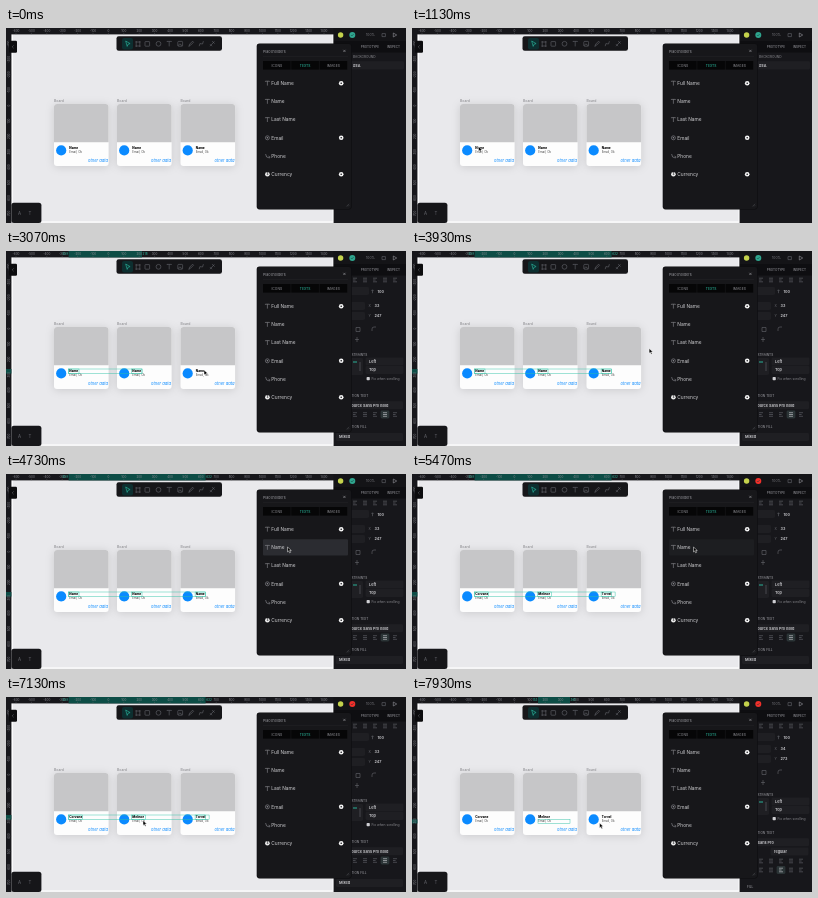
An HTML page for the animation above (8 s loop, 400 by 195 pixels).

```html
<!DOCTYPE html>
<html lang="en">
<head>
<meta charset="utf-8">
<title>Filling placeholders</title>
<style>
html, body { margin: 0; width: 100%; height: 100%; overflow: hidden; background: #e9e9ec; }
svg { display: block; width: 100%; height: 100%; }
text { font-family: Inter, "Open Sans", sans-serif; white-space: pre; }
.card { filter: drop-shadow(0 1px 4px rgba(0, 0, 0, .13)); }
</style>
</head>
<body>
<svg id="stage" viewBox="0 0 400 195" preserveAspectRatio="none"></svg>
<script>
const LOOP = 8000;
const NS = 'http://www.w3.org/2000/svg';
const stage = document.getElementById('stage');
const TEAL = '#2cc0a4', BLUE = '#0a8aff', DARK = '#17171b', FIELD = '#1f1f23';
const PALE = '#cfcfd3', DIM = '#66676d';

function add(parent, tag, attrs, content) {
  const el = document.createElementNS(NS, tag);
  for (const k in attrs) el.setAttribute(k, attrs[k]);
  if (content !== undefined) el.textContent = content;
  parent.appendChild(el);
  return el;
}
const group = (parent = stage, attrs = {}) => add(parent, 'g', attrs);
const rect = (p, x, y, width, height, fill, rx = 0, more = {}) =>
  add(p, 'rect', { x, y, width, height, fill, rx, ...more });
const text = (p, x, y, s, size, fill, more = {}) =>
  add(p, 'text', { x, y, 'font-size': size, fill, ...more }, s);
const circle = (p, cx, cy, r, fill, more = {}) => add(p, 'circle', { cx, cy, r, fill, ...more });
const line = (p, d, stroke = DIM, w = 0.6) =>
  add(p, 'path', { d, fill: 'none', stroke, 'stroke-width': w });
const outline = p => rect(p, 0, 0, 0, 0, 'none', 0, { stroke: TEAL, 'stroke-width': 0.45 });
const show = (el, on) => el.setAttribute('visibility', on ? 'visible' : 'hidden');
const lower = (el, dy) => el.setAttribute('transform', `translate(0 ${dy})`);
const place = (el, [x, y, width, height]) => {
  for (const [k, v] of Object.entries({ x, y, width, height })) el.setAttribute(k, v);
};

// Canvas and cards
rect(stage, 0, 0, 400, 195, '#e9e9ec');
line(stage, 'M6.2 6v188h321V6', '#fbfbfc', 1.6);
const cardX = [48, 111, 174.5];
const people = ['Corvane', 'Melinor', 'Torvel'];
const names = cardX.map(x => {
  text(stage, x, 74, 'Board', 3.5, '#85858a');
  const card = group(stage, { class: 'card' });
  rect(card, x, 76, 54.6, 62, '#fdfdfd', 3);
  add(card, 'path', {
    d: `M${x} 114.2V79q0 -3 3 -3h48.6q3 0 3 3v35.2z`, fill: '#c6c6c8'
  });
  circle(stage, x + 7.2, 122.4, 5.1, BLUE);
  text(stage, x + 15.3, 125.3, 'Email, Ok', 2.9, '#444');
  text(stage, x + 34, 134, 'other data', 4.1, BLUE,
    { 'font-family': 'Open Sans, sans-serif', 'font-style': 'italic' });
  return text(stage, x + 15.3, 121.3, 'Name', 3.1, '#000', { 'font-weight': 800 });
});

// Selection outlines
const whole = outline(stage);
const parts = cardX.map(() => outline(stage));

// Rulers
rect(stage, 0, 0, 330, 6.4, DARK);
rect(stage, 0, 0, 5.4, 195, DARK);
const spanX = rect(stage, 0, 0, 0, 0, '#0d4d46');
const spanY = rect(stage, 0, 0, 0, 0, '#0d4d46');
for (let i = 0; i < 21; i++) {
  const x = 10 + i * 15.4;
  text(stage, x, 3.7, -600 + i * 100, 3, '#8a8a90', { 'text-anchor': 'middle' });
  line(stage, `M${x} 4.8v1.6`, DIM, 0.4);
}
for (let i = 0; i < 12; i++) {
  const y = 16 + i * 15.4;
  text(stage, 0, 0, -400 + i * 100, 2.9, '#8a8a90',
    { 'text-anchor': 'middle', transform: `translate(3.5 ${y}) rotate(-90)` });
  line(stage, `M4.6 ${y}h.8`, DIM, 0.4);
}
const marks = [0, 1].map(i =>
  text(stage, 0, 3.9, '', 3, TEAL, { 'text-anchor': i ? 'start' : 'end' }));

// Left tab and bottom-left box
rect(stage, 3, 12.8, 8, 12, '#0c0c0e', 1.2);
line(stage, 'M7.6 17.4l-1.4 1.4 1.4 1.4', DIM, 0.6);
rect(stage, 5.4, 174.8, 30, 20.2, '#161619', 2.5);
text(stage, 12, 186.8, 'A', 4.4, DIM);
text(stage, 22.5, 186.8, 'T', 4.4, DIM);

// Toolbar
rect(stage, 110.5, 8.3, 105.5, 14.4, '#161619', 2.2);
rect(stage, 116, 10, 11, 11.4, '#0d2f30', 2);
add(stage, 'path', { d: 'M119.7 13l4.4 2.6-2 .6-.9 2.2z', fill: 'none', stroke: TEAL, 'stroke-width': 0.6 });
line(stage, 'M129.5 14h5M129.5 18h5M130.2 13v6M133.8 13v6');
rect(stage, 139, 13.6, 4.6, 4.6, 'none', 0.5, { stroke: DIM, 'stroke-width': 0.6 });
circle(stage, 152.5, 15.8, 2.4, 'none', { stroke: DIM, 'stroke-width': 0.6 });
line(stage, 'M161 14v-.6h4.4v.6M163.2 13.4v5');
rect(stage, 171.8, 13.4, 4.8, 4.8, 'none', 0.8, { stroke: DIM, 'stroke-width': 0.6 });
line(stage, 'M172 17.8l1.8-2 2.4 2');
line(stage, 'M182.8 18.4l1-2.4 2.8-2.8 1 1-2.8 2.8z');
line(stage, 'M193.2 18.2q.4-4 2-2.4t2.2-2.6');
line(stage, 'M204 18.2l4.4-4.8M204 16.2l2 2M206.2 13.2l2.4 2.4');

// Right sidebar
rect(stage, 327.6, 0, 72.4, 195, DARK);
rect(stage, 327.6, 0, 72.4, 13, '#141417');
rect(stage, 327.6, 13, 72.4, 11.5, '#0e0e11');
circle(stage, 334.6, 7, 2.7, '#c4d24c');
const status = circle(stage, 346.3, 7, 3, '#2fa58e');
line(stage, 'M344.9 7l1 1 1.8-2', '#143d3a', 0.5);
text(stage, 360, 8.3, '100%', 3.3, '#77777d');
line(stage, 'M376 5.6h3.4v3h-3.4z');
line(stage, 'M387.3 5l3.4 2-3.4 2z', '#96969c');
text(stage, 354.8, 19.6, 'PROTOTYPE', 3.1, '#a0a0a6');
text(stage, 380.8, 19.6, 'INSPECT', 3.1, '#a0a0a6');

const value = (p, x, y, s) =>
  text(p, x, y + 1.4, s, 3.8, PALE, { 'font-weight': 600 });
const field = (p, x, y, w, s) => {
  rect(p, x, y - 4, w, 8, FIELD, 1.4);
  value(p, x + 3.5, y, s);
};
const head = (p, y, s, x = 345.5) => text(p, x, y + 1.2, s, 3.2, '#a0a0a6');
const iconRow = (p, y, lit) => {
  for (let i = 0; i < 5; i++) {
    const x = 348 + i * 10;
    if (i === lit) rect(p, x - 3.4, y - 4, 8.8, 8, '#2b3436', 1.4);
    line(p, `M${x - 1} ${y - 1.8}h4M${x - 1} ${y}h${i % 2 ? 4 : 2.6}M${x - 1} ${y + 1.8}h4`,
      i === lit ? PALE : DIM);
  }
};

const emptyPane = group();
text(emptyPane, 347, 30.4, 'BACKGROUND', 3.2, '#8b8b90');
rect(emptyPane, 343, 33.2, 55, 8.2, FIELD, 1.4);
value(emptyPane, 347, 37.4, '#EA');

const designPane = group();
iconRow(designPane, 29, -1);
rect(designPane, 344, 36, 19, 8, FIELD, 1.4);
line(designPane, 'M366.5 38.8v3.4M365.5 39.8l1-1 1 1');
value(designPane, 371.5, 40.6, '100');

const position = group(designPane);
field(position, 344, 52, 15, '');
field(position, 344, 62, 15, '');
const posX = value(position, 368.5, 52, '');
const posY = value(position, 368.5, 62, '');
text(position, 362.5, 53.4, 'X', 3.4, DIM);
text(position, 362.5, 63.4, 'Y', 3.4, DIM);
line(position, 'M350 73.5h4v4h-4zM366 77v-2q0-2 2-2h2');
line(position, 'M351 83v5M349 85.5h4');

const constraints = group(designPane);
head(constraints, 97.5, 'STRAINTS');
rect(constraints, 344, 101, 13, 17, FIELD, 1.4);
line(constraints, 'M347 105h4', TEAL, 0.9);
line(constraints, 'M354 105v9');
field(constraints, 359.5, 104.4, 38, 'Left');
field(constraints, 359.5, 113, 38, 'Top');
rect(constraints, 360.6, 120, 3.2, 3.2, PALE, 0.8);
text(constraints, 365.5, 122.8, 'Fix when scrolling', 3.3, '#8b8b90');

// Text properties, from the section title downwards
function fontPane(y, font, fill) {
  const g = group();
  head(g, y, 'TION TEXT');
  rect(g, 340, y + 5.2, 57, 8, FIELD, 1.4);
  value(g, 345.5, y + 9.2, font);
  fill(g);
  return g;
}
const fonts = [
  fontPane(136, 'ource Sans Pro Bold', g => {
    iconRow(g, 154.5, 3);
    iconRow(g, 163.5, -1);
    value(g, 347, 176, '200');
    value(g, 377, 176, '100');
    head(g, 188, 'SPACING', 333);
  }),
  fontPane(145, 'ource Sans Pro Bold', g => {
    iconRow(g, 163.5, 3);
    head(g, 176, 'TION FILL');
    rect(g, 330, 182, 67, 8, FIELD, 1.4);
    value(g, 333, 186, 'Mixed');
  }),
  fontPane(136, 'Sans Pro', g => {
    field(g, 358.5, 154.5, 38, 'regular');
    iconRow(g, 164, -1);
    iconRow(g, 173, 2);
    head(g, 190, 'FILL', 335);
  })
];

// Plugin window
rect(stage, 250.7, 15.6, 95, 165.8, '#0c0c0f', 2.8);
rect(stage, 251.2, 16.1, 94, 164.8, '#17171a', 2.4);
text(stage, 257, 24.6, 'Placeholders', 3.7, '#97979d');
line(stage, 'M337.3 21.8l2.2 2.2M339.5 21.8l-2.2 2.2', '#97979d');
line(stage, 'M257 28.4h85', '#242428', 0.5);
['ICONS', 'TEXTS', 'IMAGES'].forEach((s, i) => {
  rect(stage, 257 + i * 28.3, 33, 27.6, 8.6, '#060607');
  text(stage, 270.8 + i * 28.3, 38.6, s, 3.4, i === 1 ? TEAL : '#929298', { 'text-anchor': 'middle' });
});
const hover = rect(stage, 257, 0, 85, 16.4, '', 1);
['Full Name', 'Name', 'Last Name', 'Email', 'Phone', 'Currency'].forEach((s, i) => {
  const y = 55.2 + i * 18.2, tone = '#8e8e94';
  if (i < 3) line(stage, `M259.4 ${y - 1.4}v-.6h4v.6M261.4 ${y - 2}v4.4`, tone);
  else if (i === 3) {
    circle(stage, 261.4, y, 2, 'none', { stroke: tone, 'stroke-width': 0.6 });
    circle(stage, 261.4, y, 0.8, tone);
  } else if (i === 4) line(stage, `M259.6 ${y - 2}q0 4 4 4l.3-1.2-1.4-.7`, tone);
  else {
    circle(stage, 261.4, y, 2.3, '#f2f2f2');
    text(stage, 261.4, y + 1.2, '$', 3.2, DARK, { 'text-anchor': 'middle' });
  }
  text(stage, 265.3, y + 1.8, s, 4.8, '#d0d0d3');
  if (i % 2 && i > 2 || !i) {
    circle(stage, 335.2, y, 2.3, '#f5f5f5');
    circle(stage, 335.2, y, 0.8, DARK);
  }
});
line(stage, 'M340.5 178.4l2.6-2.6M342 178.4l1.1-1.1', DIM, 0.4);

const cursor = add(stage, 'path', {
  d: 'M0 0v4.9l1.2-1 .9 1.9 1-.4-.9-1.9h1.6z', fill: '#000', stroke: '#fff', 'stroke-width': 0.5
});

// Pointer stops: [time, x, y]
const stops = [
  [250, 247, 152], [1000, 66.5, 118.5], [1400, 66.5, 118.5], [1850, 133.5, 119],
  [2300, 133.5, 119], [2950, 198, 119], [3500, 198, 119], [4400, 281.5, 73],
  [6400, 281.5, 73], [7050, 137, 123.5], [7350, 137, 123.5], [7800, 187.5, 126]
];
// Selections: [time, outer box, selected names, x, y]
const nameBox = (i, w) => [cardX[i] + 14.6, 118, w, 4.6];
const picks = [
  [0, null, 0, 0, 0], [1270, nameBox(0, 10.4), 1, 33, 247],
  [2130, nameBox(0, 73.4), 2, 33, 247], [3270, nameBox(0, 137), 3, 33, 247],
  [7200, [126, 122.4, 32, 4], 0, 34, 273]
];
const SWAP = 5300;
const ease = p => p * p * (3 - 2 * p);

function pointer(t) {
  let i = stops.length - 1;
  while (i > 0 && stops[i][0] > t) i--;
  const a = stops[i], b = stops[i + 1] || a;
  const p = b === a ? 0 : ease(Math.max(0, (t - a[0]) / (b[0] - a[0])));
  return [a[1] + (b[1] - a[1]) * p, a[2] + (b[2] - a[2]) * p];
}

function draw(t) {
  const [x, y] = pointer(t);
  cursor.setAttribute('transform', `translate(${x} ${y})`);
  show(cursor, t >= stops[0][0]);

  const swapped = t >= SWAP;
  names.forEach((n, i) => { n.textContent = swapped ? people[i] : 'Name'; });
  status.setAttribute('fill', swapped ? '#f2302b' : '#2fa58e');

  const row = Math.round((y - 55.2) / 18.2);
  show(hover, x > 257 && x < 342 && row >= 0 && row < 6);
  hover.setAttribute('y', 47 + row * 18.2);
  hover.setAttribute('fill', swapped ? '#1d1e21' : '#2b2c31');

  const [, box, count, px, py] = picks.filter(p => p[0] <= t).pop();
  [whole, spanX, spanY, designPane, ...marks].forEach(el => show(el, box));
  show(emptyPane, !box);
  fonts.forEach((f, i) => show(f, box && i === (count === 1 ? 0 : count ? 1 : 2)));
  lower(position, count > 1 ? 3 : 0);
  lower(constraints, count > 1 ? 6 : 0);
  parts.forEach((p, i) => {
    show(p, i < count);
    place(p, nameBox(i, swapped ? 14 : 10.4));
  });
  if (!box) return;
  place(whole, box);
  place(spanX, [box[0], 0, box[2], 6.4]);
  place(spanY, [0, box[1], 5.4, box[3]]);
  marks[0].setAttribute('x', box[0] - 0.6);
  marks[1].setAttribute('x', box[0] + box[2] + 0.6);
  marks[0].textContent = Math.round((box[0] - 102.4) * 6.5);
  marks[1].textContent = Math.round((box[0] + box[2] - 102.4) * 6.5);
  posX.textContent = px;
  posY.textContent = py;
}

function tick() {
  draw(performance.now() % LOOP);
  requestAnimationFrame(tick);
}
tick();
</script>
</body>
</html>
```
